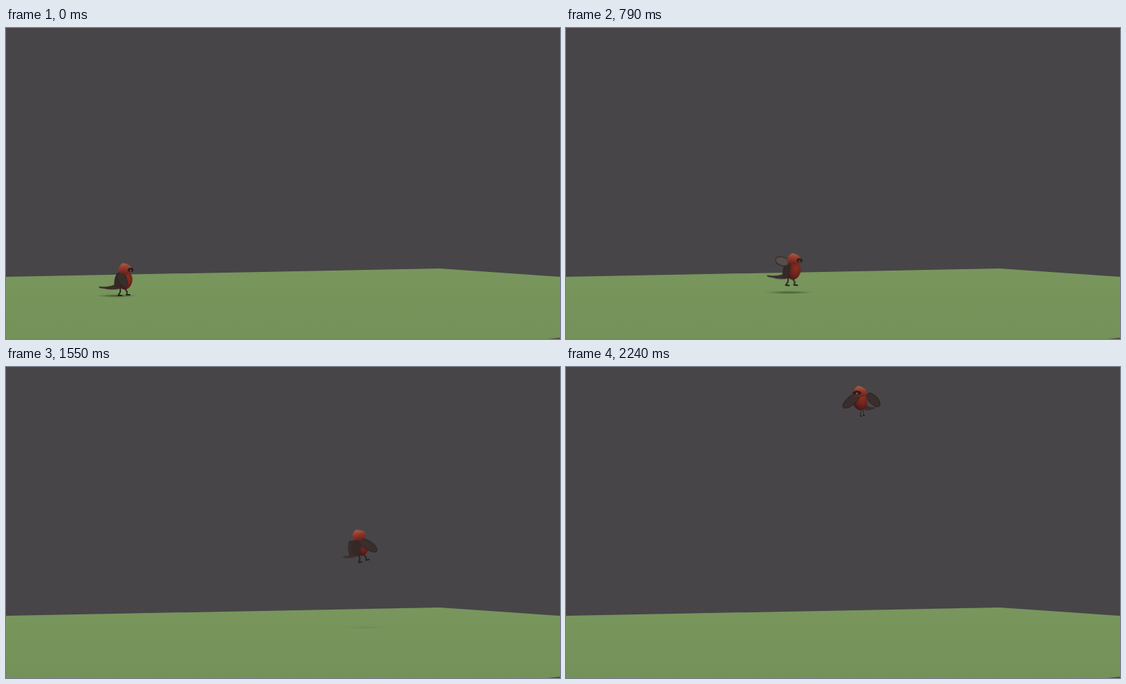
An HTML page without scripts for the animation above (2.27 s loop, 800 px wide and 450 px high).

```html
<!DOCTYPE html>
<html lang="en">
<head>
<meta charset="utf-8">
<title>Red bird taking off</title>
<style>
@property --yaw   { syntax: "<angle>";  inherits: true; initial-value: 0deg; }
@property --lean  { syntax: "<angle>";  inherits: true; initial-value: 0deg; }
@property --beat  { syntax: "<angle>";  inherits: true; initial-value: 0deg; }
@property --power { syntax: "<number>"; inherits: true; initial-value: 0; }

html, body { margin: 0; width: 100%; height: 100%; overflow: hidden; background: #474548; }
svg { display: block; width: 100vw; height: 100vh; }

#drift, #rise, #bird, #shadow { animation: 2270ms linear infinite; }
#drift { animation-name: drift; }
#rise { animation-name: rise; }
#shadow { animation-name: shadow; }

/* Yaw: 0 faces right, 90 faces the viewer. Parts are projected from it. */
#bird {
  animation-name: turn, lean, beat, launch;
  --c: cos(var(--yaw));
  --s: sin(var(--yaw));
  --flap: calc(-40deg + var(--power) * (32deg + 42deg * sin(var(--beat))));
  transform: rotate(var(--lean));
}
.wing {
  --span: 30;
  --out: calc(var(--side) * var(--s));
  --dx: calc(0 - var(--out) * var(--span) * cos(var(--flap)) - var(--c) * (12 + var(--span) * sin(var(--flap))));
  --dy: calc(0 - var(--span) * sin(var(--flap)));
  fill: color-mix(in srgb, #6c615a clamp(0%, 1% * (42 + 90 * sin(var(--flap))), 100%), #3a2e2c);
  stroke: #2b2322;
  transform: translate(calc(-1px * (4 * var(--c) + 8 * var(--out))), -10px)
    rotate(atan2(var(--dy), var(--dx)))
    scaleX(calc(hypot(var(--dx), var(--dy)) / var(--span)));
}
#near { --side: 1; }
#far { --side: -1; }
#tail { transform: scaleX(var(--c)); }
#legs { transform: scaleX(calc(.6 + .4 * var(--c))); }
#belly { transform: translateX(calc(4px * var(--c))) rotate(calc(10deg * var(--c))); }
#back {
  opacity: clamp(0, 1 - 1.5 * var(--s), 1);
  transform: translateX(calc(-6px * var(--c))) rotate(calc(10deg * var(--c))) scaleX(calc(1 - .5 * var(--s)));
}
#head { transform: translate(calc(4px * var(--c)), calc(-17px + 4px * max(0, var(--s)))); }
#face {
  opacity: clamp(0, 1 + 1.5 * var(--s), 1);
  transform: translate(calc(8px * var(--c)), 2px) scaleX(calc(.7 + .4 * var(--s)));
}

@keyframes drift {
  0% { transform: translateX(168px); }
  24.5% { transform: translateX(170px); animation-timing-function: cubic-bezier(.2, .1, .4, 1.04); }
  60% { transform: translateX(511px); animation-timing-function: cubic-bezier(.32, 0, .67, 0); }
  98.7%, 100% { transform: translateX(427px); }
}
@keyframes rise {
  0% { transform: translateY(365px); }
  24.5% { transform: translateY(366px); animation-timing-function: cubic-bezier(.2, .1, .4, 1.04); }
  60% { transform: translateY(332px); animation-timing-function: cubic-bezier(.25, .2, .6, 1); }
  98.7%, 100% { transform: translateY(49px); }
}
@keyframes shadow {
  0% { transform: translate(160px, 387.5px) scaleX(.85); opacity: .8; }
  24.5% { transform: translate(162px, 387.5px); opacity: .8; animation-timing-function: cubic-bezier(.2, .1, .4, 1.04); }
  60% { transform: translate(515px, 376.7px); opacity: .55; }
  70%, 100% { transform: translate(518px, 376.7px); opacity: 0; }
}
@keyframes turn {
  0%, 46% { --yaw: 0deg; }
  60% { --yaw: -60deg; }
  76% { --yaw: -20deg; }
  84% { --yaw: 80deg; }
  98.7%, 100% { --yaw: 125deg; }
}
@keyframes lean {
  0% { --lean: 0deg; }
  28% { --lean: 12deg; }
  44% { --lean: -8deg; }
  60% { --lean: -25deg; }
  76% { --lean: 0deg; }
  84% { --lean: -18deg; }
  98.7%, 100% { --lean: 0deg; }
}
@keyframes beat {
  from { --beat: -35deg; }
  to { --beat: 3600deg; }
}
@keyframes launch {
  0%, 24.5% { --power: 0; }
  28%, 100% { --power: 1; }
}
</style>
</head>
<body>
<svg viewBox="0 0 800 450" preserveAspectRatio="none">
  <defs>
    <linearGradient id="grass" x2="0" y2="1">
      <stop stop-color="#79965d"/><stop offset="1" stop-color="#749159"/>
    </linearGradient>
    <linearGradient id="crest" x2="0" y2="1">
      <stop stop-color="#ab6048"/><stop offset=".45" stop-color="#93382b"/><stop offset="1" stop-color="#64211d"/>
    </linearGradient>
    <radialGradient id="red" cx=".65" cy=".35" r=".7">
      <stop stop-color="#87301f"/><stop offset=".5" stop-color="#70241d"/><stop offset="1" stop-color="#3c1917"/>
    </radialGradient>
    <radialGradient id="shade">
      <stop stop-color="#26301c"/><stop offset=".45" stop-color="#35442a" stop-opacity=".7"/>
      <stop offset="1" stop-color="#55703f" stop-opacity="0"/>
    </radialGradient>
    <path id="feathers" d="M0 -3C8 -8 25 -9 30 -2C31 5 12 7 0 4Z"/>
  </defs>
  <rect width="800" height="450" fill="#474548"/>
  <path d="M0 360L626 348L800 360V450H0Z" fill="url(#grass)"/>
  <path d="M782 450L800 448.3V450Z" fill="#4b4033"/>
  <ellipse id="shadow" rx="37" ry="2.2" fill="url(#shade)"/>
  <g id="drift">
    <g id="rise">
      <g id="bird" stroke-linejoin="round" stroke-linecap="round">
        <use id="far" class="wing" href="#feathers"/>
        <path id="tail" d="M-7 3Q-15 11 -34 9Q-34 12 -27 12Q-14 15 -3 12Z" fill="#3b2d2b"/>
        <path id="legs" d="M-3 11L-3 17L-6 22L-1 22M3 11L7 17L6 21L11 21" fill="none" stroke="#231d1d" stroke-width="1.8"/>
        <ellipse id="belly" rx="10.5" ry="13.5" fill="url(#red)"/>
        <ellipse id="back" rx="5.5" ry="12" fill="#352928"/>
        <use id="near" class="wing" href="#feathers"/>
        <g id="head">
          <path d="M-10 4Q-10 -4 -3 -8Q9 -6 10 2Q6 8 0 8Q-7 8 -10 4Z" fill="url(#crest)"/>
          <g id="face">
            <ellipse rx="6" ry="3" fill="#2b1c1c"/>
            <circle cy="1" r="1.3" fill="#7d5a49"/>
          </g>
        </g>
      </g>
    </g>
  </g>
</svg>
</body>
</html>
```
